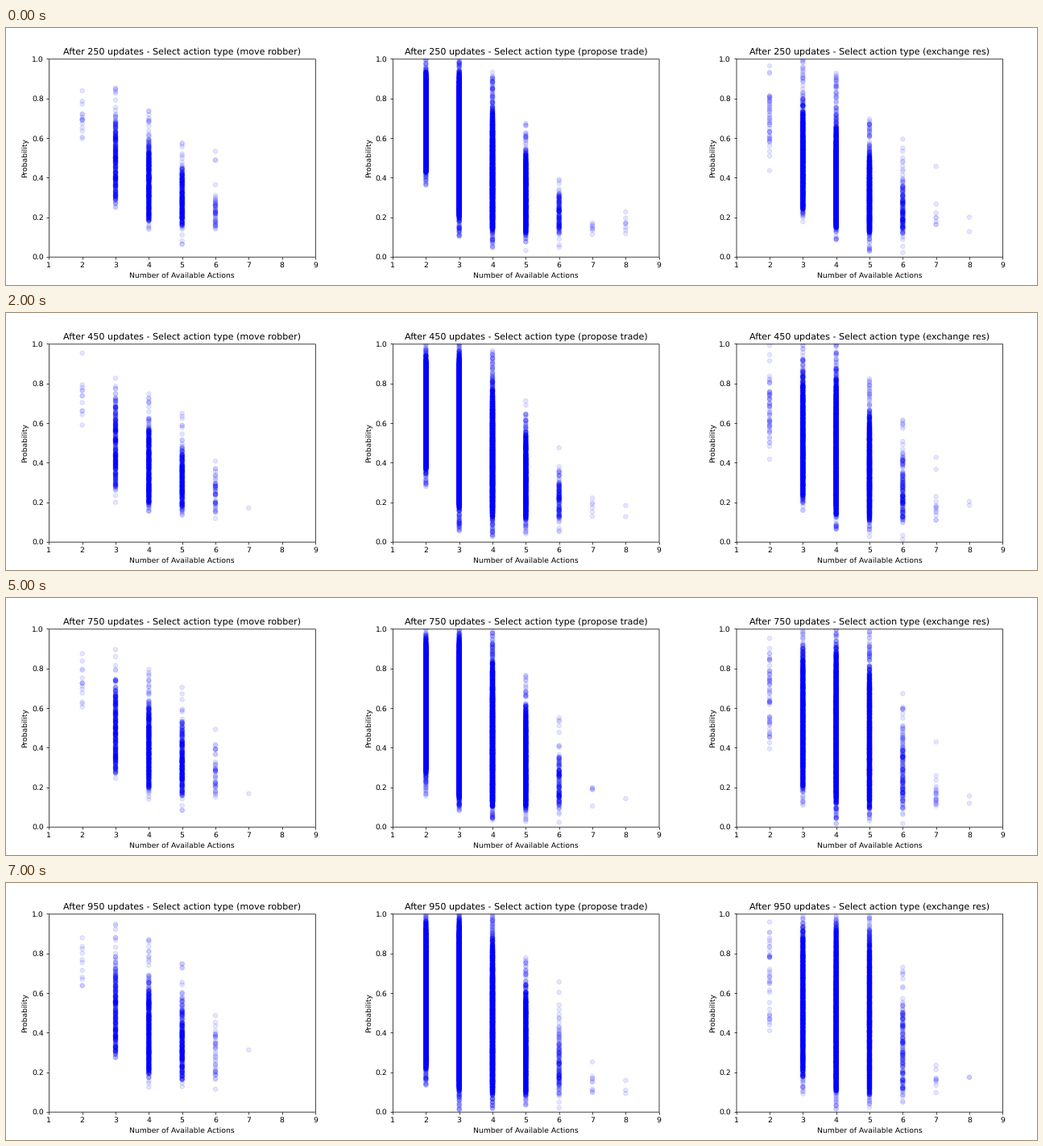
Recreate the animation shown at these times as a matplotlib script. Size 1280 px wide and 320 px high, loop 8000 ms.

```python
import numpy as np
import matplotlib.pyplot as plt
from matplotlib.animation import FuncAnimation
from matplotlib.patches import Rectangle
from matplotlib.transforms import Affine2D

UPDATES = range(250, 1050, 100)
ACTIONS = np.arange(2, 9)

# counts: typical number of points for each number of actions.
# first, last: shape of the columns (see dense_range) at both ends of the run.
# tails: how far the points thin out below and above the dense part.
PANELS = [
    dict(name="move robber", counts=(14, 300, 500, 300, 45, .6, 0),
         first=(.45, .14, .85, .83, .13), last=(.42, .15, .85, .85, .10),
         tails=(.08, .20)),
    dict(name="propose trade", counts=(3500, 5000, 3000, 1000, 130, 9, 1.5),
         first=(.32, .11, .93, 1.12, .20), last=(.14, .08, .96, 1.30, .22),
         tails=(.12, .20)),
    dict(name="exchange res", counts=(45, 1200, 2000, 1400, 150, 10, 1.5),
         first=(.42, .11, .82, .88, .12), last=(.33, .08, .93, 1.95, .35),
         tails=(.10, .30)),
]


def dense_range(panel, t):
    """Lower and upper end of the dense part for every number of actions."""
    first, last = np.array(panel["first"]), np.array(panel["last"])
    rise, floor, cap, top, slope = first + (last - first) * t
    step = ACTIONS - 2
    return floor + rise * .3 ** step, np.clip(top - slope * step, .22, cap)


def column(rng, count, low, high, tails):
    """Probabilities: a dense core with tails that thin out to both ends."""
    parts = [low + (high - low) * rng.beta(1.3, 1.5, count)]
    for edge, reach in ((low, -tails[0]), (high, tails[1])):
        end = np.clip(edge + reach * rng.uniform(.6, 1.2), .01, 1)
        n = int(abs(end - edge) * 1.5 * count ** .7)
        parts.append(edge + (end - edge) * rng.random(n) ** 2)
    return np.concatenate(parts)


def points(panel, i):
    rng = np.random.default_rng([i, len(panel["name"])])
    lows, highs = dense_range(panel, i / (len(UPDATES) - 1))
    counts = rng.poisson(panel["counts"])
    columns = [column(rng, n, low, high, panel["tails"])
               for n, low, high in zip(counts, lows, highs)]
    x = np.repeat(ACTIONS, [len(c) for c in columns])
    return np.column_stack([x, np.concatenate(columns)])


def make_panel(index):
    ax = fig.add_axes(((index + .125) / 3, .11, .775 / 3, .77))
    ax.set(xlim=(1, 9), ylim=(0, 1), xticks=range(1, 10),
           xlabel="Number of Available Actions", ylabel="Probability")
    # A soft frame between whole pixels stands in for the snapped spines.
    ax.spines[:].set_visible(False)
    nudge = Affine2D().translate(.33, -.4)
    ax.add_patch(Rectangle((0, 0), 1, 1, fill=False, lw=.8, snap=False,
                           clip_on=False, zorder=2.5,
                           transform=ax.transAxes + nudge))
    # Two line widths keep the renderer from rounding dots to whole pixels.
    return ax, ax.scatter([], [], color="blue", alpha=.1, linewidths=(1, 1))


def draw(i):
    for panel, (ax, dots) in zip(PANELS, panels):
        dots.set_offsets(points(panel, i))
        ax.set_title(f"After {UPDATES[i]} updates - "
                     f"Select action type ({panel['name']})")
    return [dots for _, dots in panels]


plt.rcParams["text.hinting"] = "none"
fig = plt.figure(figsize=(19.2, 4.8), dpi=200 / 3, facecolor="white")
panels = [make_panel(index) for index in range(len(PANELS))]
anim = FuncAnimation(fig, draw, frames=len(UPDATES), interval=1000,
                     repeat=True, repeat_delay=0)
plt.show()
```
